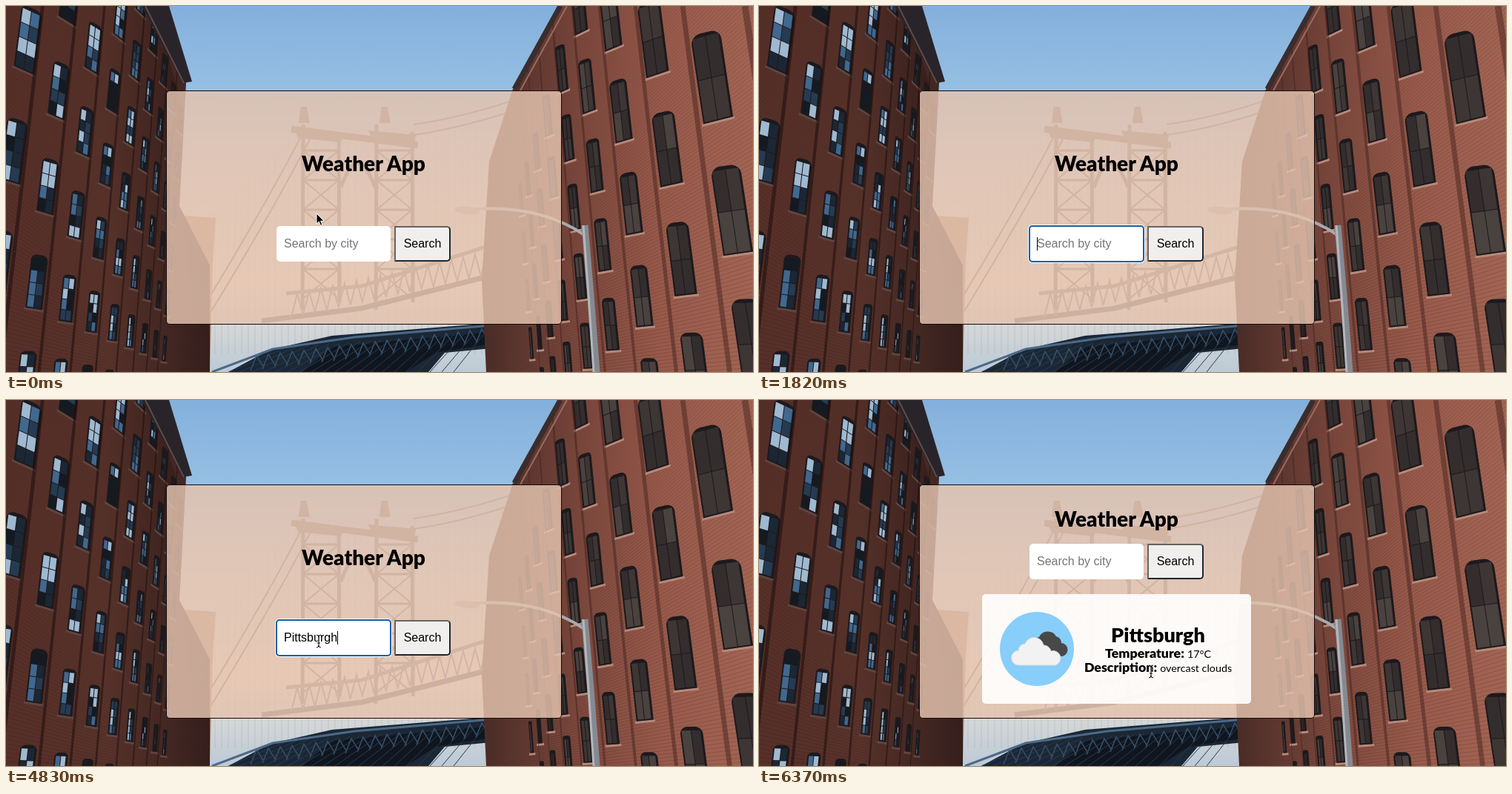
These frames come from a looping animation (1008x494 px, 8 s). An HTML page with a canvas:

```html
<!DOCTYPE html>
<html lang="en">
<head>
<meta charset="utf-8">
<title>Weather App</title>
<style>
html, body { margin: 0; width: 100%; height: 100%; overflow: hidden; background: #8fb8df; }
#stage { position: absolute; left: 0; top: 0; width: 1008px; height: 494px; overflow: hidden; }
#stage * { position: absolute; box-sizing: border-box; }
#stage p *, #typed { position: static; }
.step { animation: 8s step-end infinite; }
.lato { font-family: Lato, "Open Sans", sans-serif; color: #000; white-space: nowrap; }
#card { left: 216px; top: 114px; width: 534px; height: 316px; border: 1px solid #120b0b; border-radius: 5px; background: rgba(229, 195, 175, .83); }
h1, h2, p { margin: 0; text-align: center; }
h1, h2, b { font-weight: 900; }
#title { left: 215px; top: 194px; width: 535px; font-size: 28px; line-height: 36px; animation-name: title; }
#form { left: 0; top: 297px; font: 16px/48px "Liberation Sans", Arial, sans-serif; white-space: nowrap; animation-name: form; }
#field { left: 365px; width: 154px; height: 48px; border-radius: 5px; background: #fff; }
#focus { left: -1px; top: -1px; width: 156px; height: 50px; border: 2px solid #135ea9; border-radius: 5px; box-shadow: 0 0 0 1px #fff; animation-name: focus; }
#hint { left: 10px; color: #757575; }
#line { left: 10px; color: #000; }
#caret { left: 100%; top: 15px; width: 1px; height: 18px; background: #000; animation-name: caret; }
#button { left: 524px; width: 76px; height: 48px; border: 2px solid; border-color: #68645f #1d2731 #1d2731 #68645f; border-radius: 1px 5px 5px 1px; background: #f0efed; color: #000; line-height: 44px; text-align: center; animation-name: press; }
#result { left: 301px; top: 262px; width: 363px; height: 148px; border-radius: 5px; background: rgba(255, 255, 255, .9); animation-name: result; }
#result svg { left: 24px; top: 24px; }
#result h2, #result p { left: 136px; width: 203px; }
#result h2 { top: 39px; font-size: 27px; line-height: 32px; }
#result p { height: 20px; font-size: 14.3px; line-height: 20px; display: flex; justify-content: center; align-items: baseline; gap: 4px; }
#result b { font-size: 17.8px; }
#pointer { left: 0; top: 0; width: 0; height: 0; animation: travel 8s ease-in-out infinite; }
#pointer svg { left: 0; top: 0; overflow: visible; }
#arrow { animation-name: arrow; }
#beam { animation-name: beam; }
#hand { animation-name: hand; }
#ring { animation-name: ring; }

@keyframes title { 0% { transform: none; } 70%, 100% { transform: translateY(-52px); } }
@keyframes form { 0% { transform: none; } 70%, 100% { transform: translateY(-103px); } }
@keyframes result { 0% { opacity: 0; } 70%, 100% { opacity: 1; } }
@keyframes focus { 0% { opacity: 0; } 7% { opacity: 1; } 67.2%, 100% { opacity: 0; } }
@keyframes press { 0%, 69.1%, 100% { border-color: #68645f #1d2731 #1d2731 #68645f; } 67.2% { border-color: #17171a #6b7b91 #6b7b91 #17171a; } }
@keyframes caret {
  0%, 14%, 26.25%, 53.375%, 65.6%, 100% { opacity: 0; }
  7%, 19.25%, 31.5%, 59.5% { opacity: 1; }
}
@keyframes travel {
  0%, 2.625% { transform: translate(419px, 280px); }
  7%, 59.5% { transform: translate(418px, 325px); }
  66.5%, 75.25% { transform: translate(540px, 328px); }
  79.625%, 100% { transform: translate(529px, 366px); }
}
@keyframes arrow { 0% { opacity: 1; } 4.375%, 100% { opacity: 0; } }
@keyframes beam { 0%, 22.75%, 64.3% { opacity: 0; } 4.375%, 59.5%, 70%, 100% { opacity: 1; } }
@keyframes hand { 0%, 70%, 100% { opacity: 0; } 64.3% { opacity: 1; } }
@keyframes ring { 0%, 7.8%, 69.1%, 100% { opacity: 0; } 7%, 67.2% { opacity: 1; } }
</style>
</head>
<body>
<div id="stage">
  <canvas id="street" width="1008" height="494"></canvas>
  <div id="card"></div>
  <h1 id="title" class="lato step">Weather App</h1>
  <div id="form" class="step">
    <div id="field">
      <div id="focus" class="step"></div>
      <div id="hint">Search by city</div>
      <div id="line"><span id="typed"></span><i id="caret" class="step"></i></div>
    </div>
    <div id="button" class="step">Search</div>
  </div>
  <div id="result" class="lato step">
    <svg width="100" height="100">
      <circle cx="50" cy="50" r="50" fill="#87cefa"/>
      <path d="M44 46a10 10 0 0 1 9-12a13 13 0 0 1 23-1a9 9 0 0 1 7 9a9 9 0 0 1-1 18h-28z" fill="#484848"/>
      <path d="M26 72a10 10 0 0 1-1-20a9 9 0 0 1 9-9a13 13 0 0 1 25 2a10 10 0 0 1 10 8a9.500 9.500 0 0 1 6 19z" fill="#f2f2f2" stroke="#d9d9d9"/>
    </svg>
    <h2>Pittsburgh</h2>
    <p style="top:69px"><b>Temperature:</b><span>17°C</span></p>
    <p style="top:88px"><b>Description:</b><span>overcast clouds</span></p>
  </div>
  <div id="pointer">
    <svg id="ring" class="step" width="1" height="1"><circle r="30.500" fill="none" stroke="#000" stroke-width="1.500"/></svg>
    <svg id="arrow" class="step" width="1" height="1"><path d="M0 0v14l3.300-3l2.300 5.300l2.300-1l-2.300-5.100h4.500z" fill="#000" stroke="#fff"/></svg>
    <svg id="beam" class="step" width="1" height="1" fill="none">
      <defs><path id="bar" d="M-3-8q3 0 3 3v11q0 3-3 3M3-8q-3 0-3 3M3 9q-3 0-3-3M-2 3h4"/></defs>
      <use href="#bar" stroke="#fff" stroke-width="2.500" stroke-opacity=".6"/>
      <use href="#bar" stroke="#000"/>
    </svg>
    <svg id="hand" class="step" width="1" height="1">
      <path d="M-1.500 1.500q1.500-2 3 0v5q1.500-1.500 3 0q1.500-1 3 .5q2-.5 2.500 1.500v4l-2 3.500h-7.500l-5-6q-1-2 1-2l2 1.500z" fill="#fff" stroke="#000"/>
      <path d="M2 11v3M4.500 11v3M7 11v3" stroke="#000"/>
    </svg>
  </div>
</div>
<script>
const g = document.getElementById('street').getContext('2d');
let seed = 7;
const rand = () => (seed = seed * 16807 % 2147483647) / 2147483647;
const pick = list => list[Math.floor(rand() * list.length)];

function trace(pts) {
  g.beginPath();
  for (let i = 0; i < pts.length; i += 2) g.lineTo(pts[i], pts[i + 1]);
}
function fill(color, ...pts) {
  trace(pts);
  g.fillStyle = color;
  g.fill();
}
function line(color, width, ...pts) {
  trace(pts);
  g.strokeStyle = color;
  g.lineWidth = width;
  g.stroke();
}
function curve(color, width, x0, y0, cx, cy, x1, y1) {
  g.beginPath();
  g.moveTo(x0, y0);
  g.quadraticCurveTo(cx, cy, x1, y1);
  g.strokeStyle = color;
  g.lineWidth = width;
  g.stroke();
}
function ramp(x0, y0, x1, y1, ...colors) {
  const r = g.createLinearGradient(x0, y0, x1, y1);
  colors.forEach((c, i) => r.addColorStop(i / (colors.length - 1), c));
  return r;
}

function pane(w, h, rows, tones, trim) {
  g.fillStyle = trim;
  g.fillRect(-w / 2 - 2, h / 2, w + 4, 3);
  g.beginPath();
  g.roundRect(-w / 2, -h / 2, w, h, [w / 3, w / 3, 0, 0]);
  g.fillStyle = '#1d191c';
  g.fill();
  const pw = (w - 4) / 2, ph = (h - 6) / rows;
  for (let i = 0; i < 2 * rows; i++) {
    g.fillStyle = pick(tones);
    g.fillRect(-w / 2 + 2 + i % 2 * pw, -h / 2 + 5 + (i >> 1) * ph, pw - 1, ph - 1);
  }
}

// A brick wall whose window columns shrink with depth towards a vanishing point
function facade(f, ...shape) {
  g.save();
  fill(f.color, ...shape);
  trace(shape);
  g.clip();
  for (let y = -700; y < 900; y += 6) line('rgba(25,10,8,.14)', 1, f.vx, 530, f.near, y);
  for (let col = 0; col < 9; col++) {
    const d = f.ratio ** col;
    const pitch = f.pitch * (.28 + .72 * d);
    const w = f.width * d, h = pitch * f.tall;
    const lean = f.lean * (.4 + .6 * d);
    const x0 = f.vanish + f.reach * d, y0 = f.drop - f.rise * d;
    const gap = f.reach * d * .17;
    const foot = lean * 494;
    line(f.shade, w * .22, x0 + gap - foot * .1, 0, x0 + gap + foot * .9, 494);
    for (let k = -3; k < 5; k++) {
      const y = y0 + k * pitch, x = x0 + lean * (y - f.level);
      const slope = .3 * (y - 530) / (x - f.vx);
      g.save();
      g.transform(1, slope, lean, 1, x, y);
      pane(w, h, f.rows, f.tones, f.trim);
      g.restore();
    }
  }
  g.restore();
}

function bridge() {
  const steel = '#746a66';
  // Cables and hangers
  for (let x = 282; x < 655; x += 9) line('rgba(90,100,115,.16)', 1, x, x < 400 ? 560 - x : 160, x, 470);
  for (const d of [0, 14]) {
    curve(steel, 2, 255 + d, 425, 350 + d, 270, 400 + d, 172);
    curve(steel, 2, 550, 160 + d, 620, 150 + d, 700, 122 + d);
  }
  // Tower legs with cross bracing
  for (const x of [398, 497]) {
    const cap = x + (x - 400) * .1;
    fill(steel, x - 8, 168, x + 56, 174, x + 54, 184, x - 4, 178);
    fill(steel, cap - 3, 158, cap + 12, 158, cap + 8, 136, cap, 136);
    line(steel, 5, x + 3, 160, x + 2, 410);
    line(steel, 5, x + 51, 170, x + 52, 400);
    for (let y = 195; y < 390; y += 40) {
      line(steel, 2, x + 3, y, x + 51, y + 40);
      line(steel, 2, x + 51, y, x + 3, y + 40);
      line(steel, 3, x + 3, y, x + 51, y);
    }
  }
  line(steel, 9, 385, 166, 556, 188);
  curve(steel, 5, 452, 245, 474, 180, 498, 245);
  // Deck truss
  line('#85786f', 5, 378, 388, 480, 378, 670, 318);
  line('#59585c', 7, 345, 425, 480, 408, 670, 360);
  for (let x = 385; x < 660; x += 16) {
    const y = 388 - (x - 385) * .22;
    line('#777171', 2, x, y + 32, x + 8, y, x + 16, y + 30);
  }
  // Underside
  fill('#1b2735', 300, 494, 356, 464, 440, 445, 655, 428, 655, 462, 592, 468, 570, 494);
  fill('#10161f', 400, 494, 440, 460, 655, 440, 655, 456, 580, 468, 540, 494);
  for (let i = 0; i < 20; i++) {
    const x = 330 + i * 16, y = 472 - i * 1.9;
    line('#36516b', 1.5, x, y + 20, x + 8, y, x + 18, y + 16);
    line('#2a3948', 1, 300 + i * 16, 494, 380 + i * 14, 460 - i);
  }
  line('#4c6a88', 3, 278, 494, 360, 463, 470, 447, 655, 431);
}

function paint() {
  g.fillStyle = ramp(0, 0, 0, 494, '#83b0dc', '#98c0e4', '#d5dde2', '#eee4d8', '#bccad6');
  g.fillRect(0, 0, 1008, 494);
  bridge();
  fill('#a98068', 225, 282, 283, 286, 279, 345, 275, 494, 225, 494);

  facade({
    color: ramp(0, 0, 275, 0, '#562f28', '#58332b', '#39221f'), shade: 'rgba(28,14,14,.55)', trim: '#5f4540',
    tones: ['#141a22', '#1c2735', '#253b52', '#41688e', '#9fb9d0'], rows: 4,
    vx: 350, near: 0, vanish: 290, reach: -260, ratio: .81, width: 28,
    pitch: 150, tall: .56, lean: -.13, drop: 405, rise: 360, level: 45
  }, 0, 0, 200, 0, 243, 104, 234, 270, 275, 350, 275, 494, 0, 494);
  fill('#292429', 183, 0, 220, 0, 251, 102, 239, 104);
  line('#5c4c49', 2, 188, 0, 240, 104);

  facade({
    color: ramp(650, 0, 1008, 0, '#4f302a', '#7c483d', '#985a4b', '#a26453'), shade: 'rgba(60,30,26,.45)', trim: '#b58a7c',
    tones: ['#332d2e', '#3d3634', '#4a423f'], rows: 2,
    vx: 440, near: 1008, vanish: 650, reach: 303, ratio: .76, width: 40,
    pitch: 180, tall: .66, lean: .15, drop: 500, rise: 405, level: 100
  }, 746, 0, 1008, 0, 1008, 494, 648, 494, 642, 370, 652, 210, 684, 112);
  line('#3a2d2d', 7, 748, 0, 686, 112);
  line('#9a6b5e', 2, 757, 0, 694, 114);

  // Street lamp
  curve('#a9aaad', 4, 614, 276, 715, 264, 782, 310);
  line('#858a92', 9, 781, 296, 789, 390, 797, 494);
  line('#b3b7bb', 3, 779, 296, 786, 390, 793, 494);
  g.beginPath();
  g.ellipse(622, 276, 17, 5, .1, 0, 7);
  g.fillStyle = '#b5aaa2';
  g.fill();
}
paint();

const city = 'Pittsburgh', firstKey = 2520, keyGap = 140, answer = 5600;
const typed = document.getElementById('typed');
const hint = document.getElementById('hint');
const clock = document.getElementById('pointer').getAnimations()[0];

function tick() {
  const t = (clock.currentTime || 0) % 8000;
  const count = t < answer ? Math.floor((t - firstKey) / keyGap) + 1 : 0;
  const text = city.slice(0, Math.max(0, count));
  if (typed.textContent !== text) typed.textContent = text;
  hint.style.visibility = text ? 'hidden' : 'visible';
  requestAnimationFrame(tick);
}
tick();
</script>
</body>
</html>
```
